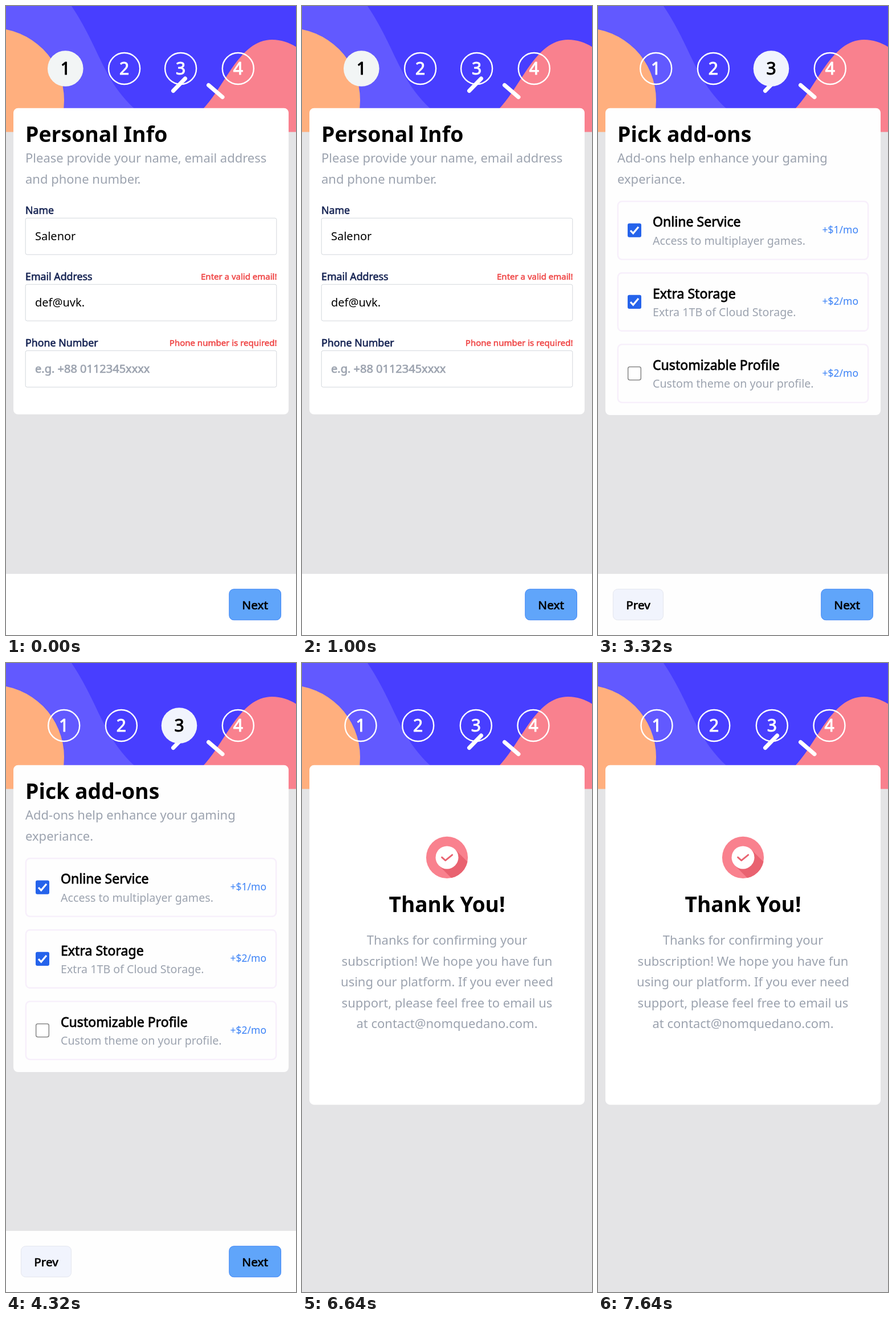
These frames come from a looping animation (509 px wide and 1101 px high, 8300 ms). An HTML page with a canvas:

```html
<!DOCTYPE html>
<html lang="en">
<head>
<meta charset="utf-8">
<title>Sign-up steps</title>
<style>
html, body { margin: 0; width: 100%; height: 100%; overflow: hidden; background: #e4e4e6; }
canvas { display: block; width: 509px; height: 1101px; }
</style>
</head>
<body>
<canvas id="stage"></canvas>
<script>
const W = 509, H = 1101, HOLD = 1660;
const LEFT = 33.7, RIGHT = 475.3;
const THIN = 0.95, THICK = 2.4;
const canvas = document.getElementById('stage');
const ctx = canvas.getContext('2d');
const ratio = window.devicePixelRatio || 1;
canvas.width = Math.round(W * ratio);
canvas.height = Math.round(H * ratio);
ctx.scale(ratio, ratio);

const GRAY = '#9ca3af', BLUE = '#3b82f6', INDIGO = '#483eff', PEACH = '#ffaf7e', PINK = '#f9818e';

function box(x1, y1, x2, y2, r, fill, edge, width = THIN) {
  const inset = edge ? width / 2 : 0;
  ctx.beginPath();
  ctx.roundRect(x1 + inset, y1 + inset, x2 - x1 - 2 * inset, y2 - y1 - 2 * inset, r);
  if (fill) { ctx.fillStyle = fill; ctx.fill(); }
  if (edge) { ctx.strokeStyle = edge; ctx.lineWidth = width; ctx.stroke(); }
}

function disc(x, y, r, fill, edge, width = THIN) {
  ctx.beginPath();
  ctx.arc(x, y, r, 0, 2 * Math.PI);
  if (fill) { ctx.fillStyle = fill; ctx.fill(); }
  if (edge) { ctx.strokeStyle = edge; ctx.lineWidth = width; ctx.stroke(); }
}

function line(points, color, width, cap = 'butt') {
  ctx.beginPath();
  points.forEach(([x, y]) => ctx.lineTo(x, y));
  ctx.strokeStyle = color;
  ctx.lineWidth = width;
  ctx.lineCap = cap;
  ctx.lineJoin = cap === 'round' ? 'round' : 'miter';
  ctx.stroke();
}

function plus(x, y, r, color, width) {
  line([[x - r, y], [x + r, y]], color, width);
  line([[x, y - r], [x, y + r]], color, width);
}

function text(str, x, y, size, color, align = 'left', weight = 400) {
  ctx.font = `${weight} ${size}px "Noto Sans", "Open Sans", sans-serif`;
  ctx.textAlign = align;
  ctx.fillStyle = color;
  ctx.fillText(str, x, y);
}

// Medium weight: the regular face with a thin outline.
function medium(str, x, y, size, color, align = 'left') {
  text(str, x, y, size, color, align);
  ctx.strokeStyle = color;
  ctx.lineWidth = size * 0.034;
  ctx.lineJoin = 'round';
  ctx.strokeText(str, x, y);
}

function heading(title, ...lines) {
  text(title, 34, 237.5, 37.4, '#000', 'left', 700);
  lines.forEach((s, i) => text(s, 34, 274 + i * 36.5, 22, GRAY));
}

function banner() {
  ctx.fillStyle = INDIGO;
  ctx.fillRect(0, 0, W, 220);
  ctx.save();
  ctx.beginPath();
  ctx.rect(0, 0, W, 220.5);
  ctx.clip();

  ctx.fillStyle = '#6259ff';
  ctx.beginPath();
  ctx.moveTo(0, 0);
  ctx.lineTo(115, 0);
  ctx.bezierCurveTo(165, 75, 170, 130, 228, 182);
  ctx.lineTo(0, 182);
  ctx.fill();

  disc(-24.4, 165, 126.4, PEACH);

  ctx.fillStyle = PINK;
  ctx.beginPath();
  ctx.moveTo(346, 180);
  ctx.bezierCurveTo(385, 140, 410, 59, 467, 59);
  ctx.bezierCurveTo(483, 59, 497, 64, 509, 71.5);
  ctx.lineTo(509, 221);
  ctx.lineTo(346, 221);
  ctx.fill();

  line([[293.5, 148.5], [314.5, 127]], '#fff', 7, 'round');
  line([[355.5, 138.5], [380, 159.5]], '#fff', 7, 'round');
  ctx.restore();
}

// The current step is a larger filled disc; the middle gap takes up the slack.
function steps(active, fill) {
  const small = 57.4, big = 62.6, gap = 43.3, y = 109.5;
  const any = active < 4;
  let x = any ? 73 : 74.3;
  const total = 4 * small + (any ? big - small : 0);
  const middle = W - 2 * x - total - 2 * gap;
  for (let i = 0; i < 4; i++) {
    const on = i === active;
    const size = on ? big : small;
    const cx = x + size / 2;
    if (on) disc(cx, y, size / 2, fill);
    else disc(cx, y, (size - THICK) / 2, null, '#fff', THICK);
    medium(String(i + 1), cx, 120.3, 30, on ? '#000' : '#fff', 'center');
    x += size + (i === 1 ? middle : gap);
  }
}

function button(x1, x2, label, fill, edge) {
  box(x1, 1020.3, x2, 1075.2, 8, fill, edge);
  medium(label, (x1 + x2) / 2, 1055.5, 20.8, '#000', 'center');
}

function field(i, label, value, error) {
  const y = 370.8 + i * 116;
  medium(label, 34, y - 7.1, 17.8, '#172554');
  if (error) medium(error, 475.5, y - 7.8, 15, '#ef4444', 'right');
  box(LEFT, y, RIGHT, y + 64.8, 3, '#fff', '#d1d5db');
  if (value) text(value, 51, y + 39.2, 20, '#000');
  else medium('e.g. +88 0112345xxxx', 51, y + 39.2, 20, GRAY);
}

function personalInfo() {
  heading('Personal Info', 'Please provide your name, email address', 'and phone number.');
  field(0, 'Name', 'Salenor');
  field(1, 'Email Address', 'def@uvk.', 'Enter a valid email!');
  field(2, 'Phone Number', '', 'Phone number is required!');
}

function joystick(x, y) {
  box(x - 8, y - 3, x + 8, y + 13, 1, '#fff');
  box(x - 2.5, y - 3.5, x + 2.5, y + 6, 1, PEACH);
  box(x - 1.2, y - 8, x + 1.2, y + 4, 1, '#fff');
  disc(x, y - 9, 4.6, '#fff');
  box(x - 5, y + 7.2, x - 1.5, y + 9.2, 1, PEACH);
}

function slimPad(x, y) {
  box(x - 13.5, y - 6.3, x + 13.5, y + 6.3, 6.3, '#fff');
  plus(x - 7, y, 3.3, PINK, 1.8);
  [[-3, 0], [3, 0], [0, -3], [0, 3]].forEach(([dx, dy]) => disc(x + 7 + dx, y + dy, 1.2, PINK));
}

function gamepad(x, y) {
  ctx.beginPath();
  ctx.moveTo(x - 9, y - 9.5);
  ctx.lineTo(x + 9, y - 9.5);
  ctx.quadraticCurveTo(x + 13.5, y - 9, x + 13.5, y - 2);
  ctx.bezierCurveTo(x + 13.5, y + 9, x + 11, y + 13, x + 7, y + 7);
  ctx.quadraticCurveTo(x + 5.5, y + 4, x + 4, y + 4);
  ctx.lineTo(x - 4, y + 4);
  ctx.quadraticCurveTo(x - 5.5, y + 4, x - 7, y + 7);
  ctx.bezierCurveTo(x - 11, y + 13, x - 13.5, y + 9, x - 13.5, y - 2);
  ctx.quadraticCurveTo(x - 13.5, y - 9, x - 9, y - 9.5);
  ctx.fillStyle = '#fff';
  ctx.fill();
  plus(x - 6, y - 2.5, 3.5, INDIGO, 1.8);
  disc(x + 6, y - 2.5, 2.8, null, INDIGO, 1.8);
}

function plan(i, name, price, color, icon) {
  const y = 346 + i * 138.3;
  box(LEFT, y, RIGHT, y + 112, 8, '#f7f2f6', i === 1 ? BLUE : null);
  disc(82, y + 48, 26.2, color);
  icon(82, y + 48);
  medium(name, 134, y + 49.2, 25.8, '#000');
  text(price, 134, y + 81.7, 20.4, GRAY);
}

function selectPlan() {
  heading('Select Your Plan', 'You have the option to select monthly or', 'yearly billing.');
  plan(0, 'Arcade', '9$', PEACH, joystick);
  plan(1, 'Advanced', '12$', PINK, slimPad);
  plan(2, 'Pro', '15$', INDIGO, gamepad);
  text('Monthly', 139.5, 784, 19.6, '#0f172a', 'left', 700);
  text('Yearly', 311, 784, 20.6, '#0f172a');
  box(239, 760.8, 296.2, 792, 15.6, '#e4e4e8');
  disc(254.6, 776.4, 12.4, '#fcfcfc', '#d0d0d6');
}

function addOn(i, name, note, price, checked) {
  const y = 340.8 + i * 125.2;
  box(LEFT, y, RIGHT, y + 104, 7, '#fefefe', '#f7effb', THICK);
  if (checked) {
    box(52, y + 39.8, 76, y + 64, 3, '#2563eb');
    line([[57, y + 52.2], [61.7, y + 57], [71, y + 46]], '#fff', 3.2);
  } else {
    box(52, y + 39.8, 76, y + 64, 3, '#fff', '#767676', 1.3);
  }
  medium(name, 96, y + 45.5, 23.1, '#000');
  text(note, 96, y + 77, 19.65, GRAY);
  text(price, 457, y + 57.3, 17.5, BLUE, 'right');
}

function pickAddOns() {
  heading('Pick add-ons', 'Add-ons help enhance your gaming', 'experiance.');
  addOn(0, 'Online Service', 'Access to multiplayer games.', '+$1/mo', true);
  addOn(1, 'Extra Storage', 'Extra 1TB of Cloud Storage.', '+$2/mo', true);
  addOn(2, 'Customizable Profile', 'Custom theme on your profile.', '+$2/mo', false);
}

function finishing() {
  heading('Finishing Up', 'Double check everything looks OK before', 'Confirming.');
  medium('Advanced(Monthly)', 54.5, 389.2, 20.4, '#000');
  text('chnage', 54.5, 416.3, 17, '#000');
  line([[54.5, 418.6], [113, 418.6]], '#000', 1.2);
  medium('$12/mo', 454.5, 402, 19.8, '#000', 'right');
  line([[LEFT, 445.4], [RIGHT, 445.4]], '#e2e5ea', 1.4);
  const rows = [['Online Service', '+$1/mo'], ['Extra Storage', '+$2/mo']];
  rows.forEach(([name, price], i) => {
    const y = 485.4 + i * 36.5;
    text(name, 54.5, y, 17.3, '#6b7280');
    medium(price, 454.5, y, 17.7, '#1f2937', 'right');
  });
  line([[LEFT, 551], [RIGHT, 551]], '#eceff2', 1.3);
  text('Total cost (per month)', 54.5, 593.5, 17.35, '#6b7280');
  medium('+$15/mo', 454.5, 595, 20, '#2563eb', 'right');
}

function thanks() {
  const x = 254.5, y = 340.4, deep = '#e96270';
  disc(x, y, 36.6, PINK);
  ctx.save();
  ctx.clip();
  line([[x, y], [x + 40, y + 40]], deep, 40);
  ctx.restore();
  disc(x, y, 20, '#fff');
  line([[x - 9, y - 0.3], [x - 2.8, y + 5.2], [x + 9.2, y - 4.6]], deep, 2.8, 'round');
  text('Thank You!', x, 436, 37, '#000', 'center', 700);
  [
    'Thanks for confirming your',
    'subscription! We hope you have fun',
    'using our platform. If you ever need',
    'support, please feel free to email us',
    'at contact@nomquedano.com.'
  ].forEach((s, i) => text(s, x, 493 + i * 36.5, 22, GRAY, 'center'));
}

const screens = [
  { draw: personalInfo, bottom: 714.8, card: '#fff', page: '#e4e4e6', chip: '#f2f5f5' },
  { draw: selectPlan, bottom: 812.6, card: '#fcfcfc', page: '#e5e5e7', chip: '#f7f2f6', edge: '#e7e2e6' },
  { draw: pickAddOns, bottom: 716, card: '#fefefe', page: '#e4e4e6', chip: '#f1f4fd', edge: '#e3e5ee' },
  { draw: finishing, bottom: 645.6, card: '#fcfeff', page: '#e5e5e7', chip: '#f6f3f5', edge: '#ebe1e8' },
  { draw: thanks, bottom: 773.2, card: '#fff', page: '#e4e4e6' }
];

function render(i) {
  const s = screens[i];
  ctx.fillStyle = s.page;
  ctx.fillRect(0, 0, W, H);
  banner();
  steps(i, s.chip);
  box(13, 178.8, 496, s.bottom, 8, s.card);
  s.draw();
  if (i === 4) return;
  ctx.fillStyle = s.card;
  ctx.fillRect(0, 994, W, H - 994);
  if (i > 0) button(26, 115, 'Prev', s.chip, s.edge);
  if (i < 3) button(391.3, 483, 'Next', '#60a5fa', BLUE);
  else button(344.3, 483, 'Subscribe', '#4ade80', '#22c55e');
}

const start = performance.now();
function tick() {
  const t = performance.now() - start;
  render(Math.floor(t / HOLD) % screens.length);
  requestAnimationFrame(tick);
}
tick();
</script>
</body>
</html>
```
